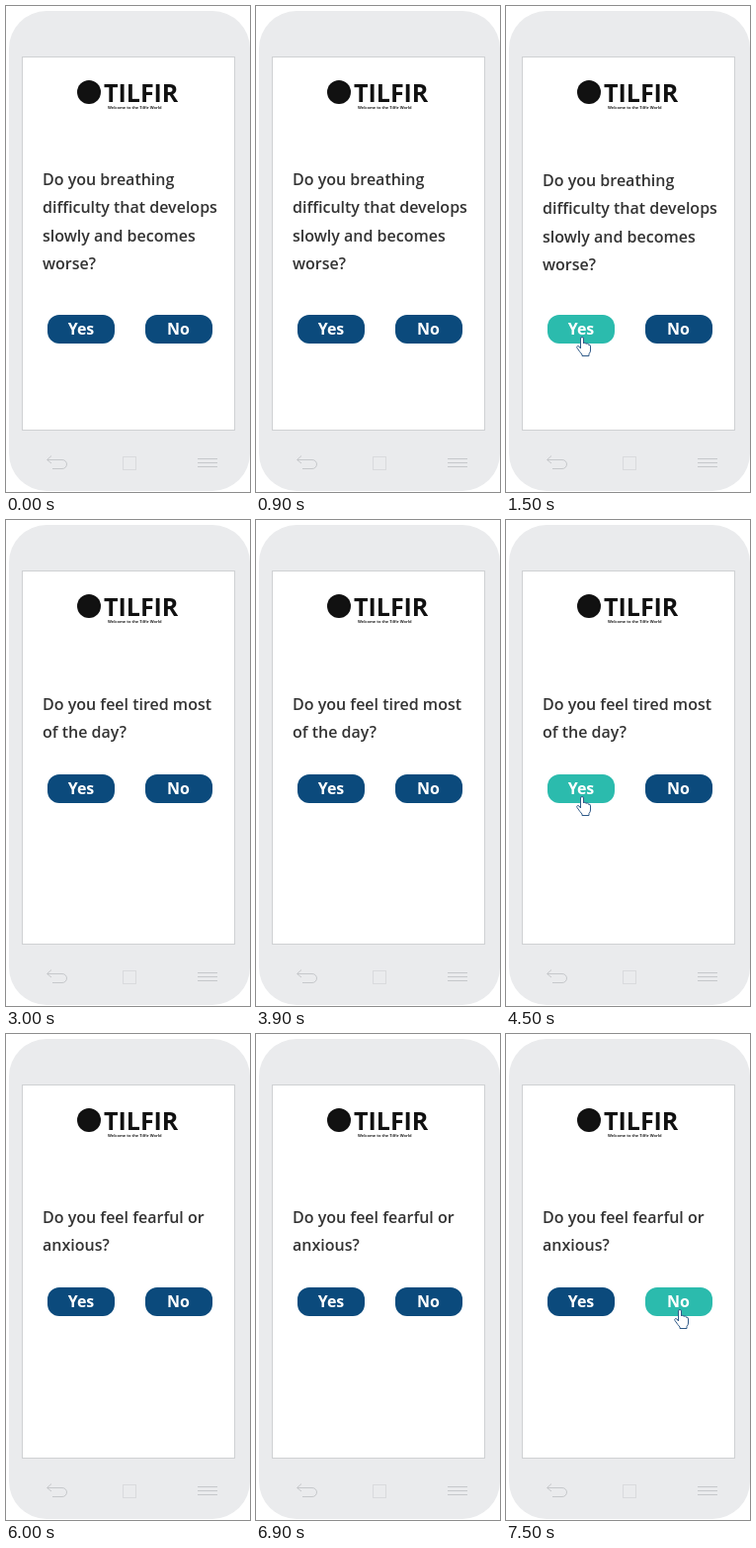
Recreate the animation shown at these times as an HTML page. Size 247 by 491 pixels, loop 8 s.

```html
<!DOCTYPE html>
<html lang="en">
<head>
<meta charset="utf-8">
<title>Symptom questions</title>
<style>
  html, body { margin: 0; width: 100%; height: 100%; overflow: hidden; background: #fff; }
  svg { display: block; width: 247px; height: 491px; }
  text { font-family: "Open Sans", sans-serif; font-weight: 600; font-size: 16px; }
  .question { fill: #333; }
  .label { fill: #fff; font-weight: 700; text-anchor: middle; }
  .brand { font-weight: 700; font-size: 25px; fill: #111; }
  .tagline { font-weight: 700; font-size: 4px; fill: #222; }
  .keys { fill: none; stroke: #c6c8cb; }
</style>
</head>
<body>
<svg viewBox="0 0 247 491">
  <rect x="3" y="5" width="244" height="485" rx="38" fill="#eaebed"/>
  <rect x="16.5" y="51.5" width="215" height="377" fill="#fff" stroke="#cfd1d3"/>

  <circle cx="84" cy="87" r="12" fill="#111"/>
  <text class="brand" x="99" y="97">TILFIR</text>
  <text class="tagline" x="103" y="104">Welcome to the Tilfir World</text>

  <g class="keys">
    <path d="M46 454.500L41.500 458.500L46 462M42 458.500H57A4.500 4.500 0 0 1 57 467.500H47"/>
    <rect x="118.500" y="455.500" width="13" height="13" stroke="#d9dadd"/>
    <path d="M194 457.500H214M194 461.500H214M194 465.500H214"/>
  </g>

  <g id="question"></g>
  <g id="buttons">
    <g transform="translate(42 0)">
      <rect width="68" height="29" rx="12"/>
      <text class="label" x="34" y="20">Yes</text>
    </g>
    <g transform="translate(141 0)">
      <rect width="68" height="29" rx="12"/>
      <text class="label" x="33.500" y="20">No</text>
    </g>
    <path id="hand" fill="#fff" stroke="#2f5a88" stroke-linejoin="round"
      d="M4.500 12V2Q4.500 .500 6 .500T7.500 2V7Q8 6 9 6.300T10 7.500Q10.500 6.700 11.500 7T12.500 8.300Q14.500 7.500 14.500 10V14Q14.500 16 13 17.500V19.500H6V18Q4 16 1 11.500Q.200 10 1.500 9.500T4.500 12Z"/>
  </g>
</svg>
<script>
const LOOP = 8000, LINE = 28.4, NAVY = '#0b4a7c', TEAL = '#2bbbad';
const breathing = ['Do you breathing', 'difficulty that develops', 'slowly and becomes', 'worse?'];
const tired = ['Do you feel tired most', 'of the day?'];
const fearful = ['Do you feel fearful or', 'anxious?'];

// picked: index of the pressed button, -1 for none
const steps = [
  { at: 0,    lines: breathing, textY: 181, buttonY: 312, picked: -1 },
  { at: 1500, lines: breathing, textY: 182, buttonY: 312, picked: 0 },
  { at: 3000, lines: tired,     textY: 192, buttonY: 257, picked: -1 },
  { at: 4500, lines: tired,     textY: 192, buttonY: 257, picked: 0 },
  { at: 6000, lines: fearful,   textY: 191, buttonY: 256, picked: -1 },
  { at: 7500, lines: fearful,   textY: 191, buttonY: 256, picked: 1 },
];

const question = document.getElementById('question');
const buttons = document.getElementById('buttons');
const hand = document.getElementById('hand');
const plates = buttons.querySelectorAll('rect');

function show({ lines, textY, buttonY, picked }) {
  question.innerHTML = lines.map((line, i) =>
    `<text class="question" x="37" y="${textY + i * LINE}">${line}</text>`).join('');
  buttons.setAttribute('transform', `translate(0 ${buttonY})`);
  plates.forEach((plate, i) => plate.setAttribute('fill', i === picked ? TEAL : NAVY));
  hand.style.display = picked < 0 ? 'none' : '';
  hand.setAttribute('transform', `translate(${picked === 1 ? 170 : 71} 22)`);
}

let current;
const start = performance.now();
function tick() {
  const time = (performance.now() - start) % LOOP;
  const step = steps.filter(s => s.at <= time).pop();
  if (step !== current) show(current = step);
  requestAnimationFrame(tick);
}
tick();
</script>
</body>
</html>
```
